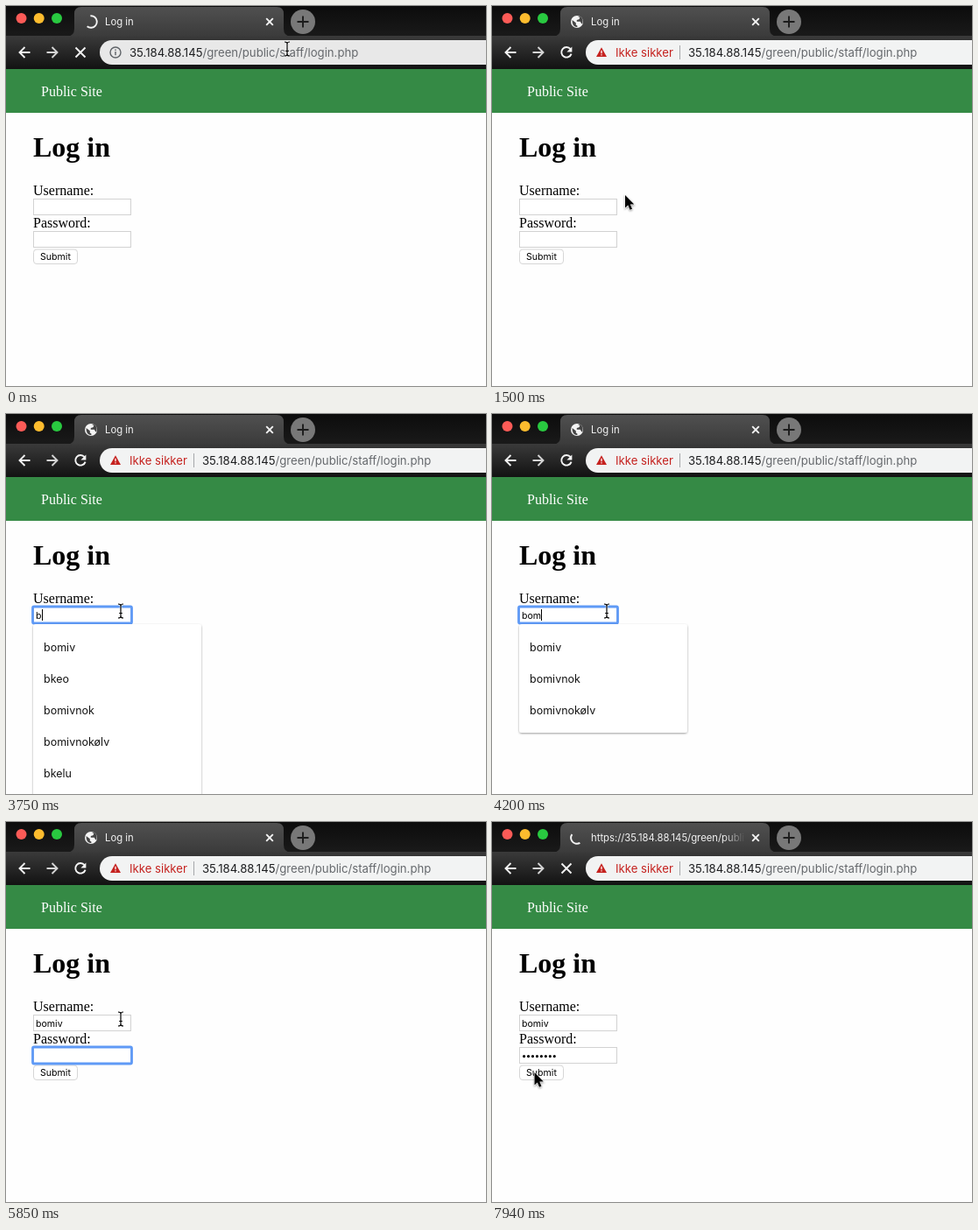
Animation, 548 px wide and 434 px high, one loop 8 s. Source, as an HTML page:

```html
<!DOCTYPE html>
<html lang="en">
<head>
<meta charset="utf-8">
<title>Log in</title>
<style>
  html, body { margin: 0; width: 100%; height: 100%; overflow: hidden; background: #fefefe; }
  svg { display: block; width: 548px; height: 434px; }
  text { white-space: pre; }
  .ui { font-family: Inter, Roboto, sans-serif; }
  .url { font-size: 13.15px; }
  .tab { font-size: 11.3px; }
  .form { font-size: 10.6px; }
  .option { font-size: 12.5px; fill: #161616; }
  .page { font: 16px "Liberation Serif", "Noto Serif", serif; }
  .line { fill: none; stroke: #f4f4f4; stroke-width: 1.9; }
  .field { fill: #fff; stroke: #d2d2d2; }
</style>
</head>
<body>
<svg viewBox="0 0 548 434">
  <defs>
    <linearGradient id="strip" x2="0" y2="1"><stop stop-color="#0c0c0c"/><stop offset="1" stop-color="#1a1a1a"/></linearGradient>
    <linearGradient id="tabFill" x2="0" y2="1"><stop stop-color="#505050"/><stop offset="1" stop-color="#3b3b3b"/></linearGradient>
    <linearGradient id="bar" x2="0" y2="1"><stop stop-color="#3a3a3a"/><stop offset="1" stop-color="#121212"/></linearGradient>
    <linearGradient id="fade" gradientUnits="userSpaceOnUse" x1="264" x2="289" y1="0" y2="0"><stop stop-color="#f2f2f2"/><stop offset="1" stop-color="#f2f2f2" stop-opacity="0"/></linearGradient>
    <clipPath id="titleClip"><rect x="110" y="4" width="178" height="28"/></clipPath>
    <filter id="soft"><feGaussianBlur stdDeviation=".6"/></filter>
    <filter id="shadow" x="-10%" y="-10%" width="120%" height="125%"><feDropShadow dx="0" dy="1" stdDeviation="1.2" flood-opacity=".38"/></filter>
  </defs>

  <rect width="548" height="434" fill="#fefefe"/>

  <!-- browser frame -->
  <rect width="548" height="35" fill="url(#strip)"/>
  <rect y="34" width="548" height="38" fill="url(#bar)"/>
  <path d="M70 34.5Q78 34.5 78 26V9Q78 1 86 1H309Q317 1 317 9V26Q317 34.5 325 34.5Z" fill="url(#tabFill)"/>
  <circle cx="17.5" cy="14" r="6" fill="#fc5b57"/>
  <circle cx="37.7" cy="14" r="6" fill="#fdbc2e"/>
  <circle cx="58" cy="14" r="6" fill="#29c940"/>
  <circle cx="339" cy="18" r="14" fill="#787878"/>
  <path class="line" d="M332.5 18h13M339 11.5v13" style="stroke:#1c1c1c"/>
  <path class="line" d="M297.2 14.2l7.6 7.6m0-7.6l-7.6 7.6" stroke-width="1.6"/>
  <g clip-path="url(#titleClip)"><text id="title" class="ui tab" x="113" y="22" fill="url(#fade)"></text></g>
  <g id="globe">
    <circle cx="97" cy="18" r="7" fill="#f4f4f4"/>
    <path d="M91.6 16l4.2 3.2v2.2l1.6 1.2v1.6Q91 23.5 91.6 16ZM98 12l2.4 1-1 2.2-2.6.8v1.8h4l1.6 2.8 1-.8Q104.5 14 100 11.8Z" fill="#444"/>
  </g>
  <circle id="spinner" class="line" cx="97" cy="18" r="6.8" pathLength="360"/>

  <path class="line" d="M27.5 53H15.5m6-6l-6 6 6 6"/>
  <path class="line" d="M46.5 53h12m-6-6l6 6-6 6" style="stroke:#d4d4d4"/>
  <path id="stop" class="line" d="M79.5 47.5l11 11m0-11l-11 11"/>
  <g id="reload">
    <path class="line" d="M89.6 49.2A5.8 5.8 0 1 0 90.6 54.6"/>
    <path d="M91.4 46.4v6h-6Z" fill="#f4f4f4"/>
  </g>

  <!-- address bar -->
  <rect id="address" x="107" y="39" width="470" height="28" rx="14"/>
  <g id="info" fill="none" stroke="#5f6368" stroke-width="1.4">
    <circle cx="125" cy="53" r="6"/><path d="M125 52v4.2M125 49.4v1.5"/>
  </g>
  <g id="warning">
    <path d="M125 47.2l6 10.8h-12Z" fill="#c5221f"/>
    <path d="M125 50.8v3.4M125 55.2v1.4" stroke="#fff" stroke-width="1.3"/>
    <text class="ui url" x="141" y="58" fill="#c5221f">Ikke sikker</text>
    <path d="M214.5 45v16" stroke="#a5a7aa"/>
  </g>
  <text id="url" class="ui url" y="58" fill="#65686c"><tspan fill="#1d1e20">35.184.88.145</tspan>/green/public/staff/login.php</text>

  <!-- page -->
  <rect y="72" width="548" height="50" fill="#358a45"/>
  <text class="page" x="40" y="103" fill="#fff">Public Site</text>
  <text class="page" x="31" y="172" style="font-size:32px;font-weight:bold">Log in</text>
  <text class="page" x="31" y="216">Username:</text>
  <text class="page" x="31" y="253">Password:</text>
  <rect class="field" x="31.5" y="220.5" width="111" height="18"/>
  <rect class="field" x="31.5" y="257.5" width="111" height="18"/>
  <rect x="31.5" y="278" width="50" height="16.5" rx="3.5" fill="#fff" stroke="#d6d6d6"/>
  <text class="ui form" x="39" y="290">Submit</text>
  <rect id="ring" x="30.5" width="113" height="19" rx="1.5" fill="none" stroke="#5f9af6" stroke-width="2.8" filter="url(#soft)"/>
  <text id="user" class="ui form" x="34" y="234"></text>
  <path id="dots" d="M36.6 267.6H140" stroke="#000" stroke-width="3.2" stroke-linecap="round"/>
  <path id="caret" stroke="#000"/>
  <g id="menu">
    <rect id="panel" x="31" y="240" width="192" rx="3" fill="#fff" filter="url(#shadow)"/>
    <g id="options"></g>
  </g>

  <!-- pointers -->
  <path id="arrow" d="M0 0V14.6L3.3 11.6 5.5 16.8 8 15.7 5.8 10.6H10.3Z" stroke="#fff" stroke-width="1.1" paint-order="stroke" style="filter:drop-shadow(0 1px 1px #0006)"/>
  <g id="beam" fill="none">
    <path d="M-3-8Q0-8 0-6Q0-8 3-8M0-6V6M-3 8Q0 8 0 6Q0 8 3 8M-1.8 2.5H1.8" stroke="#fff" stroke-width="2.6" opacity=".75"/>
    <path d="M-3-8Q0-8 0-6Q0-8 3-8M0-6V6M-3 8Q0 8 0 6Q0 8 3 8M-1.8 2.5H1.8" stroke="#000" stroke-width="1.2"/>
  </g>
</svg>

<script>
const LOOP = 8000;
const names = ['bomiv', 'bkeo', 'bomivnok', 'bomivnokølv', 'bkelu'];

// Each track holds its value until the next entry.
const typed = [[0, ''], [2850, 'b'], [3450, 'bk'], [3600, 'bke'], [3750, 'b'],
  [4050, 'bo'], [4200, 'bom'], [4350, 'bomi'], [4500, 'bomiv']];
const secret = [[0, 0], [6000, 2], [6150, 4], [6300, 6], [6450, 8]];
const focus = [[0, ''], [2850, 'user'], [5400, 'password'], [7340, '']];
const caretOn = [[0, false], [2850, true], [4950, false], [5400, true], [5850, false], [6000, true], [6750, false]];
const pointer = [
  [0, ['beam', 321, 49]], [150, ['beam', 319, 55]], [300, ['arrow', 309, 88]],
  [450, ['arrow', 294, 130]], [600, ['arrow', 280, 168]], [750, ['arrow', 271, 182]],
  [900, ['arrow', 266, 173]], [1200, ['arrow', 246, 182]], [1350, ['arrow', 189, 204]],
  [1500, ['arrow', 152, 216]], [1650, ['arrow', 146, 217]], [1800, ['beam', 138, 224]],
  [1950, ['beam', 133, 225]], [2100, ['beam', 131, 225]], [6450, ['arrow', 116, 240]],
  [6600, ['arrow', 84, 264]], [6750, ['arrow', 56, 282]], [6890, ['arrow', 49, 287]],
  [7040, ['arrow', 48.5, 286]]
];

const $ = id => document.getElementById(id);
const at = (track, t) => track.findLast(([start]) => start <= t)[1];
const set = (id, attrs) => { for (const key in attrs) $(id).setAttribute(key, attrs[key]); };
const show = (id, on) => set(id, { visibility: on ? 'visible' : 'hidden' });
const write = (id, value) => { if ($(id).textContent !== value) $(id).textContent = value; };

names.forEach((_, i) => {
  const option = document.createElementNS('http://www.w3.org/2000/svg', 'text');
  option.setAttribute('class', 'ui option');
  option.setAttribute('x', 43);
  option.setAttribute('y', 271 + 36 * i);
  $('options').append(option);
});

function drawBrowser(t) {
  const opening = t < 450, submitting = t >= 7490, busy = opening || submitting;
  show('globe', !busy);
  show('reload', !busy);
  show('stop', busy);
  show('spinner', busy);
  const turn = opening ? -95 + Math.floor(t / 150) * 55 : 105 - Math.ceil((t - 7940) / 150) * 45;
  set('spinner', {
    'stroke-dasharray': opening ? '225 360' : '155 360',
    transform: `rotate(${turn} 97 18)`
  });
  write('title', submitting ? 'https://35.184.88.145/green/public/staff' : 'Log in');
  show('info', opening);
  show('warning', !opening);
  set('url', { x: opening ? 141 : 224 });
  set('address', { fill: t < 300 ? '#e8e8e8' : '#f2f3f3' });
}

function drawForm(t) {
  const name = at(typed, t), count = at(secret, t), active = at(focus, t);
  const inUser = active === 'user';
  write('user', name);
  show('dots', count > 0);
  set('dots', { d: `M36.6 267.6h${(count - 1) * 4.95 + .1}`, 'stroke-dasharray': '0 4.95' });

  show('ring', active);
  set('ring', { y: inUser ? 220 : 257 });
  const caretX = inUser ? 34.5 + Math.round($('user').getComputedTextLength()) : 35.5 + count * 4.95;
  set('caret', { d: `M${caretX} ${inUser ? 223 : 260}v13` });
  show('caret', active && at(caretOn, t));

  const open = inUser && t < 5250;
  const matches = open ? names.filter(n => n.startsWith(name)) : [];
  $('menu').style.display = open ? '' : 'none';
  set('panel', { height: 16 + 36 * matches.length });
  [...$('options').children].forEach((option, i) => { option.textContent = matches[i] || ''; });
}

function drawPointer(t) {
  const [kind, x, y] = at(pointer, t);
  for (const id of ['arrow', 'beam']) show(id, id === kind);
  set(kind, { transform: `translate(${x} ${y})` });
}

const origin = performance.now();
function frame() {
  const t = (performance.now() - origin) % LOOP;
  drawBrowser(t);
  drawForm(t);
  drawPointer(t);
  requestAnimationFrame(frame);
}
frame();
</script>
</body>
</html>
```
